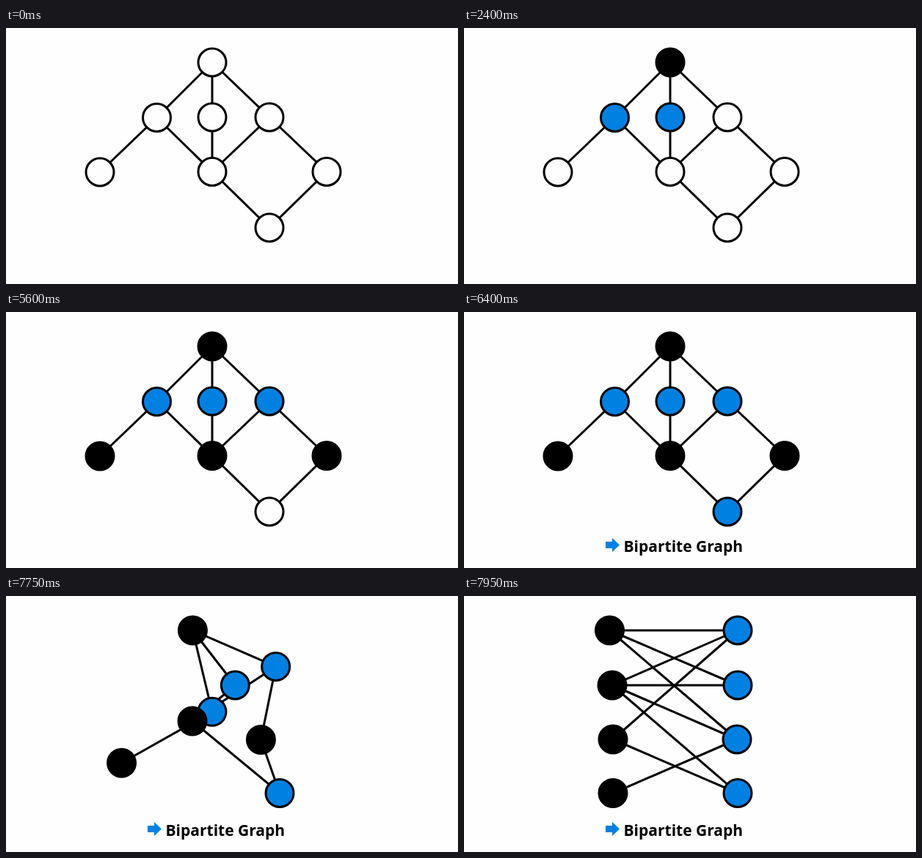
These frames come from a looping animation (616x350 px, 9.95 s). An HTML page:

```html
<!DOCTYPE html>
<html lang="en">
<head>
<meta charset="utf-8">
<title>Bipartite graph</title>
<style>
  html, body { margin: 0; width: 100%; height: 100%; overflow: hidden; background: #fefefe; }
  svg { display: block; width: 616px; height: 350px; }
  line, circle { stroke: #000; stroke-width: 3; }
  text { font: 700 21px "Open Sans", "Noto Sans", sans-serif; }
</style>
</head>
<body>
<svg viewBox="0 0 616 350">
  <g id="edges"></g>
  <g id="nodes"></g>
  <g id="label">
    <path d="M193 314H202V309L212 318.5L202 328V323H193Z" fill="#0080e0"/>
    <text x="217.5" y="327.5">Bipartite Graph</text>
  </g>
</svg>
<script>
const LOOP = 9950, MOVE = 7700, STEP = 50, LABEL = 6400;
const BLACK = '#000', BLUE = '#0080e0';

// at: time the node is coloured; home: rest position;
// path: positions at steps 1, 4 and 6 of the rearrangement
const nodes = [
  { at: 800,  color: BLACK, home: [281, 47],      path: [[269, 47], [226, 47], [198.5, 47]] },
  { at: 1600, color: BLUE,  home: [205.5, 122.5], path: [[247.5, 143.5], [335, 181.5], [372, 196]] },
  { at: 2400, color: BLUE,  home: [281, 122],     path: [[293, 122], [346, 122], [373, 122]] },
  { at: 3200, color: BLUE,  home: [359, 122],     path: [[363, 109], [373, 71.5], [373, 47]] },
  { at: 4000, color: BLACK, home: [128, 197],     path: [[144, 214], [182, 252], [203, 269.5]] },
  { at: 4800, color: BLACK, home: [281, 196.5],   path: [[269.5, 187], [226, 143.5], [202, 122]] },
  { at: 5600, color: BLACK, home: [437, 196.5],   path: [[395, 196.5], [266, 196.5], [203, 196]] },
  { at: 6400, color: BLUE,  home: [359, 273],     path: [[373, 269.5], [373, 269.5], [373, 269.5]] }
];
const links = [[0, 1], [0, 2], [0, 3], [1, 4], [1, 5], [2, 5], [3, 5], [3, 6], [5, 7], [6, 7]];

function add(parent, tag) {
  const el = document.createElementNS('http://www.w3.org/2000/svg', tag);
  return document.getElementById(parent).appendChild(el);
}

function set(el, attrs) {
  for (const key in attrs) el.setAttribute(key, attrs[key]);
}

const lines = links.map(() => add('edges', 'line'));
const discs = nodes.map(() => add('nodes', 'circle'));
const label = document.getElementById('label');
discs.forEach(d => set(d, { r: 19 }));

// Smooth curve through the three points of a path
function along([a, b, c], s) {
  const wa = (s - 4) * (s - 6) / 15;
  const wb = (s - 1) * (s - 6) / -6;
  const wc = (s - 1) * (s - 4) / 10;
  return a.map((v, i) => v * wa + b[i] * wb + c[i] * wc);
}

function draw(t) {
  const step = Math.min(6, Math.floor((t - MOVE) / STEP) + 1);
  const pos = nodes.map(n => step < 1 ? n.home : along(n.path, step));
  links.forEach(([a, b], i) => set(lines[i], {
    x1: pos[a][0], y1: pos[a][1], x2: pos[b][0], y2: pos[b][1]
  }));
  nodes.forEach((n, i) => set(discs[i], {
    cx: pos[i][0], cy: pos[i][1], fill: t >= n.at ? n.color : '#fefefe'
  }));
  label.style.visibility = t >= LABEL ? 'visible' : 'hidden';
}

const start = performance.now();
function tick() {
  draw((performance.now() - start) % LOOP);
  requestAnimationFrame(tick);
}
tick();
</script>
</body>
</html>
```
